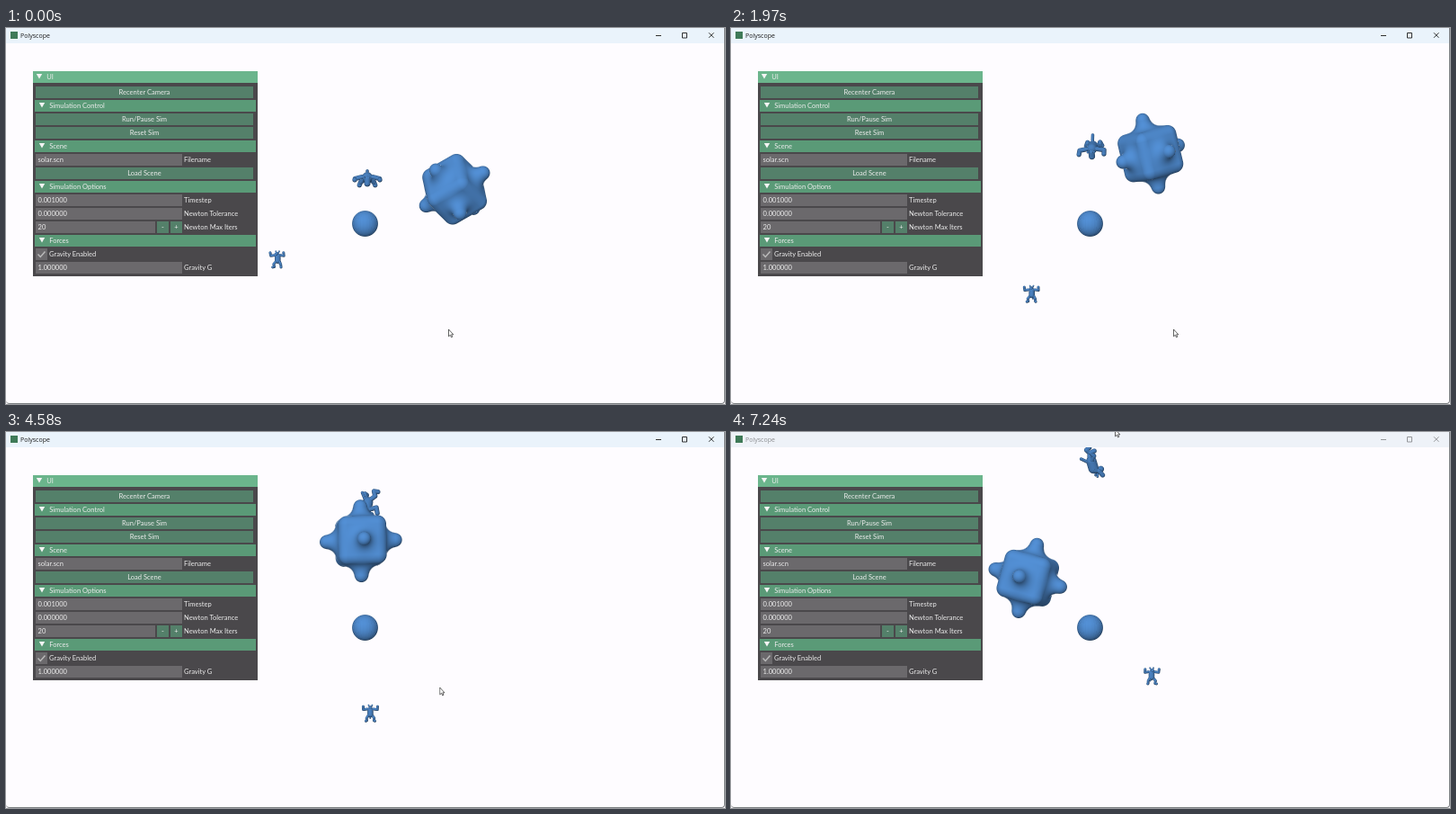
An HTML page with a canvas for the animation above (7.27 s loop, 800x418 px).

```html
<!DOCTYPE html>
<html lang="en">
<head>
<meta charset="utf-8">
<title>Polyscope</title>
<style>
html, body { margin: 0; width: 100%; height: 100%; overflow: hidden; background: #fefcff; }
#stage { position: relative; width: 800px; height: 418px; overflow: hidden; background: #fefcff; }
#stage > * { position: absolute; }
#scene { left: 0; top: 0; }
#frame { inset: 0; box-sizing: border-box; border: solid #7d8083; border-width: 0 1px 1px 0; border-radius: 0 0 4px 4px; }

#bar { left: 0; top: 0; width: 799px; height: 17px; background: #eaf3fb; color: #1b1b1b; font: 7px/17px "Open Sans", sans-serif; }
#bar span { position: absolute; left: 16px; top: 0; }
#bar i { position: absolute; left: 5px; top: 4px; width: 8px; height: 8px; background: #3f7a58; }
#bar svg { position: absolute; left: 720px; top: 0; fill: none; stroke: currentColor; stroke-width: .9; }
#bar.idle { background: #eef2f8; color: #8b8d90; }

#panel { left: 30px; top: 47.5px; width: 249.5px; height: 228.5px; background: #4a484b; color: #ececec; font: 7.55px/13px Lato, sans-serif; white-space: nowrap; }
#panel div { display: flex; height: 13px; margin: 0 3px 2px; }
#panel div > * { flex: none; }
#panel .top { margin: 0 0 4px; padding-left: 3.5px; background: #6bb58c; }
#panel .head { margin: 0 2px 2px; padding-left: 4.5px; background: #5a9a77; }
.top::before, .head::before { content: ""; flex: none; width: 7px; height: 6px; margin: 3px 4.7px 0 0; background: #f4f4f4; clip-path: polygon(0 0, 100% 0, 50% 100%); }
#panel b { font-weight: 400; text-align: center; background: #54806a; width: 242px; }
#panel b.s { width: 13px; margin-left: 2px; }
#panel u { text-decoration: none; box-sizing: border-box; width: 163px; padding-left: 2.5px; background: #6b696c; }
#panel u.n { width: 133px; }
#panel u.c { width: 13px; padding: 0; }
#panel u + span, #panel b + span { margin-left: 2px; }
#panel svg { display: block; fill: none; stroke: #b9b9b9; stroke-width: 1.5; }

#tip { left: 395px; top: 9px; width: 62px; height: 20px; box-sizing: border-box; border: 1px solid #1c1d1f; border-radius: 2.5px; background: #2c2d30; color: #fff; font: 7.3px/18px "Open Sans", sans-serif; text-align: center; white-space: nowrap; }
#mouse { left: 0; top: 0; }
</style>
</head>
<body>
<div id="stage">
  <canvas id="scene" width="800" height="418"></canvas>
  <div id="panel">
    <div class="top">UI</div>
    <div><b>Recenter Camera</b></div>
    <div class="head">Simulation Control</div>
    <div><b>Run/Pause Sim</b></div>
    <div><b>Reset Sim</b></div>
    <div class="head">Scene</div>
    <div><u>solar.scn</u><span>Filename</span></div>
    <div><b>Load Scene</b></div>
    <div class="head">Simulation Options</div>
    <div><u>0.001000</u><span>Timestep</span></div>
    <div><u>0.000000</u><span>Newton Tolerance</span></div>
    <div><u class="n">20</u><b class="s">-</b><b class="s">+</b><span>Newton Max Iters</span></div>
    <div class="head">Forces</div>
    <div><u class="c"><svg width="13" height="13"><path d="M2.5 6.5 5.3 9.5 10.5 3.5"/></svg></u><span>Gravity Enabled</span></div>
    <div><u>1.000000</u><span>Gravity G</span></div>
  </div>
  <div id="bar"><i></i><span>Polyscope</span>
    <svg width="79" height="17"><path d="M3 8.5H9M32.5 5.5h5v5.5h-5zM62 5.3l5.5 5.5M67.5 5.3l-5.5 5.5"/></svg>
  </div>
  <div id="frame"></div>
  <div id="tip">Stop recording</div>
  <svg id="mouse" width="8" height="12"><path d="M.5 .5V8.4L2.3 6.8 3.5 9.4 4.7 8.9 3.6 6.3H5.8Z" fill="#fff" stroke="#222" stroke-width=".7"/></svg>
</div>
<script>
const LOOP = 7270;
const $ = id => document.getElementById(id);
const ctx = $("scene").getContext("2d");
const pad = document.createElement("canvas");
const padCtx = pad.getContext("2d");
const { abs, min, max, hypot, sin, cos, sqrt, PI } = Math;
const RAD = PI / 180;
const clamp = (v, a = 0, b = 1) => min(b, max(a, v));

// Rotate v about the unit axis n.
function turn([x, y, z], [a, b, c], deg) {
  const C = cos(deg * RAD), S = sin(deg * RAD), k = (a * x + b * y + c * z) * (1 - C);
  return [
    x * C + (b * z - c * y) * S + a * k,
    y * C + (c * x - a * z) * S + b * k,
    z * C + (a * y - b * x) * S + c * k
  ];
}
const X = [1, 0, 0], Y = [0, 1, 0], Z = [0, 0, 1], AXES = [X, Y, Z];

// Distance fields, y up and z towards the viewer.
const ball = (x, y, z) => hypot(x, y, z) - 14.4;

function spikyCube(x, y, z) {
  x = abs(x); y = abs(y); z = abs(z);
  const box = sqrt(max(x - 17, 0) ** 2 + max(y - 17, 0) ** 2 + max(z - 17, 0) ** 2) - 10;
  const m = max(x, y, z), side = x * x + y * y + z * z - m * m;
  const spike = sqrt(side + max(m - 38.5, 0) ** 2) - 7.5;
  const k = 16, h = max(k - abs(box - spike), 0) / k;
  return min(box, spike) - h * h * k / 4;
}

// Right half of the figure: a radius and the joints of each limb.
const BODY = [
  [.33, [0, .28, 0], [0, -.22, 0]],
  [.2, [0, .55, .15], [0, .5, .45]],
  [.08, [.14, .68, .1], [.2, .82, .05]],
  [.15, [.35, .38, 0], [.78, .32, .1], [.8, .66, .25]],
  [.15, [.24, -.35, 0], [.42, -.62, .15], [.4, -.9, 0], [.5, -.95, .25]],
  [.1, [0, -.3, -.3], [0, -.6, -.6]]
];
const BONES = BODY.flatMap(([r, ...joints]) => joints.slice(1).map((p, i) => {
  const [a, b, c] = joints[i], u = p[0] - a, v = p[1] - b, w = p[2] - c;
  return { a, b, c, u, v, w, r, q: u * u + v * v + w * w };
}));
const figure = size => (x, y, z) => {
  x = abs(x) / size; y /= size; z /= size;
  let best = 9;
  for (const l of BONES) {
    const dx = x - l.a, dy = y - l.b, dz = z - l.c;
    const s = clamp((dx * l.u + dy * l.v + dz * l.w) / l.q);
    const ex = dx - s * l.u, ey = dy - s * l.v, ez = dz - s * l.w;
    best = min(best, sqrt(ex * ex + ey * ey + ez * ez) - l.r);
  }
  return best * size;
};
const small = figure(10), large = figure(17.5);

// Ray-march one body with local axes A, B, C and lay it over the scene.
function draw(field, [cx, cy], reach, [A, B, C], gain = 1, facet = 0) {
  const left = Math.floor(cx - reach), top = Math.floor(cy - reach), size = 2 * reach + 1;
  pad.width = pad.height = size;
  const img = padCtx.createImageData(size, size);
  for (let j = 0; j < size; j++) for (let i = 0; i < size; i++) {
    const x = left + i + .5 - cx, y = cy - top - j - .5;
    if (x * x + y * y > reach * reach) continue;
    const at = (x, y, z) => field(
      x * A[0] + y * A[1] + z * A[2],
      x * B[0] + y * B[1] + z * B[2],
      x * C[0] + y * C[1] + z * C[2]);
    let z = reach, near = 99, hit = z;
    for (let n = 0; n < 40 && z > -reach; n++) {
      const d = at(x, y, z) + .5;
      if (d < near) { near = d; hit = z; }
      if (d < .06) break;
      z -= d * .95;
    }
    if (near >= 1) continue;
    const d = at(x, y, hit), e = .3;
    let nx = at(x + e, y, hit) - d, ny = at(x, y + e, hit) - d, nz = at(x, y, hit + e) - d;
    const len = hypot(nx, ny, nz) || 1;
    nx /= len; ny /= len; nz /= len;
    if (facet) {
      const flat = hypot(nx, nz);
      nz = flat * cos(Math.round(Math.atan2(nx, nz) / facet) * facet);
    }
    const lum = gain * (.56 + .37 * max(nz, 0) + .15 * ny - .07 * nx);
    img.data.set([86 * lum, 149 * lum, 221 * lum, 255 * (near < .06 ? 1 : 1 - near)], 4 * (j * size + i));
  }
  padCtx.putImageData(img, 0, 0);
  ctx.drawImage(pad, left, top);
}

const SUN = [399.5, 217.5];
const polar = (r, deg) => [SUN[0] + r * cos(deg * RAD), SUN[1] - r * sin(deg * RAD)];

const SPIN = [.09, .74, .667];
const CUBE = [[.72, -.49, .49], [.536, .844, .02], [-.42, .24, .875]];
const FOCAL = 484;

function frame(now) {
  const ms = now % LOOP, t = ms / 1000;
  ctx.clearRect(0, 0, 800, 418);
  draw(ball, SUN, 16, AXES, 1, .22);

  // Two bodies circle the ball on opposite sides, slowly closing in.
  const angle = 21 + 13 * t + .72 * t ** 2 - .03 * t ** 3;
  const radius = 106.7 - 1.75 * t - .105 * t ** 2;
  draw(small, polar(radius - 2, angle + 180.8), 13, AXES.map(v => turn(v, Y, 5 * t - 22)), .92);

  // The tumbling figure drifts upwards.
  const rise = 15.5 * t + 1.3 * t ** 2 - .13 * t ** 3;
  const tumble = v => turn(turn(turn(v, Y, 10.5 * t), X, 78 + 16.5 * t), Z, -20 * sin(.57 * t));
  draw(large, [402, 167 - rise], 24, AXES.map(tumble), .9);

  // Off-centre bodies show more of their inner side.
  const place = polar(radius, angle), view = (place[0] - 400) / FOCAL / RAD;
  draw(spikyCube, place, 49, CUBE.map(v => turn(turn(v, SPIN, 60.1 * (t - 3.77)), Y, view)));

  const p = clamp((ms - 4380) / 820), go = p * p * (3 - 2 * p);
  $("mouse").style.transform = `translate(${492 - 65 * go}px, ${334.5 - 338 * go}px)`;
  $("tip").style.visibility = ms >= 5760 && ms < 7060 ? "visible" : "hidden";
  $("bar").className = ms >= 7060 ? "idle" : "";
  requestAnimationFrame(loop);
}
const start = performance.now();
function loop() { frame(performance.now() - start); }
loop();
</script>
</body>
</html>
```
